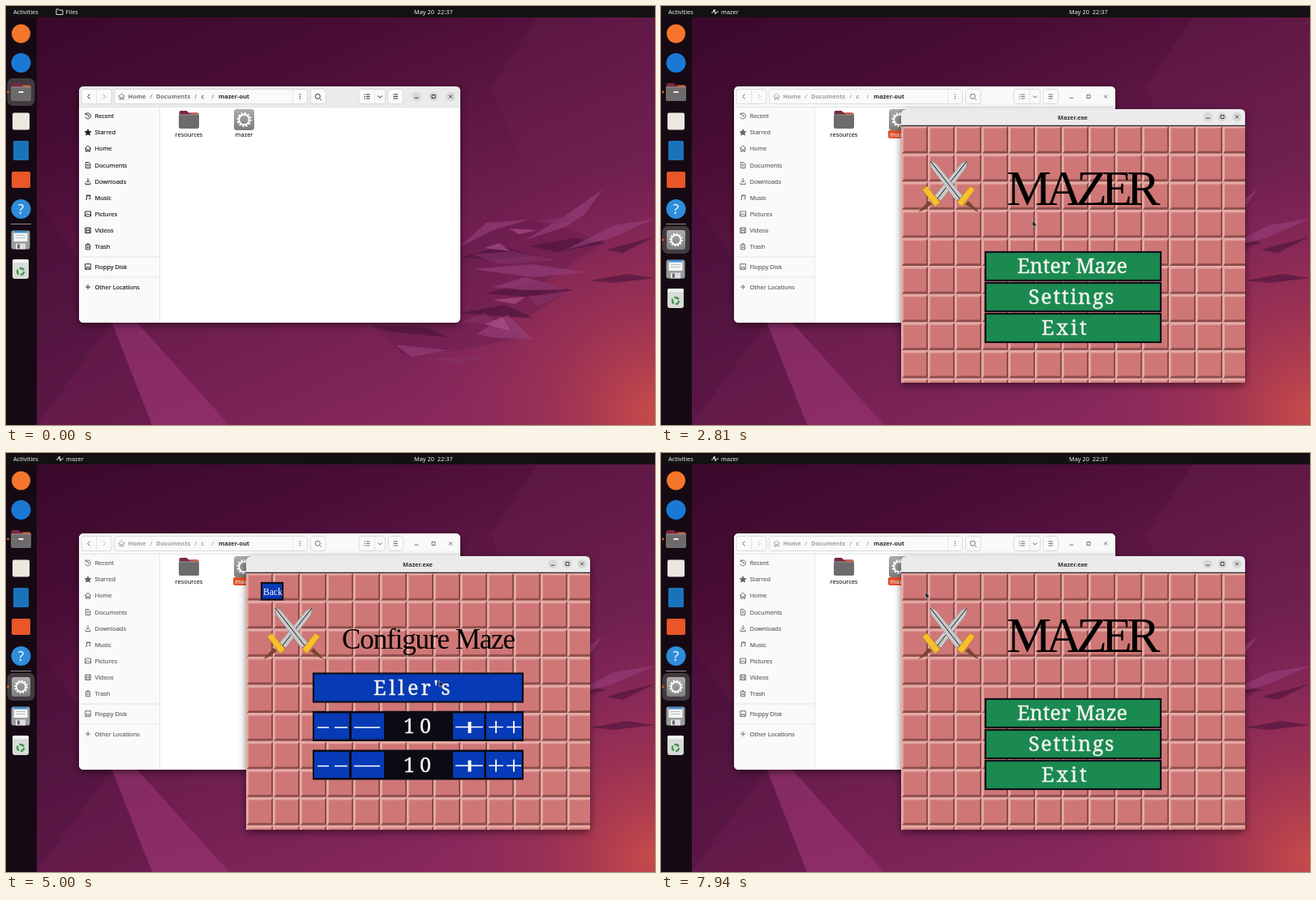
An HTML page for the animation above (8000 ms loop, 800x516 px).

```html
<!DOCTYPE html>
<html lang="en">
<head>
<meta charset="utf-8">
<title>Desktop maze game</title>
<style>
html, body { margin: 0; width: 100%; height: 100%; overflow: hidden; background: #2c0a22; }
svg { display: block; width: 100vw; height: 100vh; }
text { font: 500 7.4px "Noto Sans", "Open Sans", sans-serif; white-space: pre; }
.bold { font-weight: 700; }
.mid { text-anchor: middle; }
.btn { font: 400 25px "Noto Serif", "Liberation Serif", serif; fill: #f4f4ee; stroke: #f4f4ee; stroke-width: .4; }
.title { font: 400 62px "Liberation Serif", "Noto Serif", serif; letter-spacing: -6.9px; }
.sub { font: 400 35px "Liberation Serif", "Noto Serif", serif; letter-spacing: -1.1px; }
.back { font: 400 11.5px "Liberation Serif", serif; fill: #fff; }
.line { fill: none; stroke: currentColor; stroke-width: .9; }

.t { animation: 8s step-end infinite; }
.before { animation-name: before; }
.after { animation-name: after; }
.picked { animation-name: picked; }
.focused { animation-name: focused; }
.blurred { animation-name: blurred; }
.ink { animation-name: ink; fill: currentColor; }
.ink text:not(.bold) { stroke: currentColor; stroke-width: .16; }
.head { animation-name: head; }
.config { animation-name: config; }
.menu { animation-name: menu; }
.tree { animation-name: tree; }
.eller { animation-name: eller; }
.hand { animation-name: hand; }
.arrow { animation-name: arrow; }
.slide { animation: slide 8s infinite; }
.launch { animation: launch 8s infinite; }
.game { animation: game 8s infinite; transform-origin: 508px 296px; }
.pointer { animation: pointer 8s ease-in-out infinite; }

@keyframes before { 0% { opacity: 1 } 27% { opacity: 0 } }
@keyframes after { 0% { opacity: 0 } 27% { opacity: 1 } }
@keyframes picked { 0% { opacity: 0 } 21.5% { opacity: 1 } }
@keyframes focused { 0% { opacity: 1 } 31.2% { opacity: 0 } }
@keyframes blurred { 0% { opacity: 0 } 31.2% { opacity: 1 } }
@keyframes ink { 0% { color: #1c1c1c } 31.2% { color: #626262 } }
@keyframes head { 0% { fill: #ebebeb } 31.2% { fill: #f9f9f9 } }
@keyframes config { 0% { opacity: 0 } 43.75% { opacity: 1 } 95% { opacity: 0 } }
@keyframes menu { 0% { opacity: 1 } 43.75% { opacity: 0 } 95% { opacity: 1 } }
@keyframes tree { 0% { opacity: 1 } 61% { opacity: 0 } }
@keyframes eller { 0% { opacity: 0 } 61% { opacity: 1 } }
@keyframes hand { 0% { opacity: 0 } 7% { opacity: 1 } 13% { opacity: 0 } }
@keyframes arrow { 0% { opacity: 0 } 13% { opacity: 1 } }
@keyframes slide {
  0%, 27.6% { transform: translateY(0); animation-timing-function: ease-in-out }
  30.4%, 100% { transform: translateY(36px) }
}
@keyframes launch { 0%, 28.8% { opacity: 0 } 30.8%, 100% { opacity: 1 } }
@keyframes game {
  0%, 31.2% { opacity: 0; transform: scale(.92); animation-timing-function: ease-out }
  33.2%, 100% { opacity: 1; transform: none }
}
@keyframes pointer {
  0%, 7% { transform: translate(806px, 330px) }
  11.2%, 12% { transform: translate(421px, 258px) }
  20%, 31% { transform: translate(289px, 134px) }
  35.1%, 36.5% { transform: translate(458px, 264px) }
  41%, 45% { transform: translate(508px, 356px) }
  50%, 65% { transform: translate(534px, 280px) }
  71%, 76% { transform: translate(602px, 335px) }
  80%, 84% { transform: translate(602px, 382px) }
  93%, 100% { transform: translate(326px, 171px) }
}
</style>
</head>
<body>
<svg id="stage" viewBox="0 0 800 516" preserveAspectRatio="none"></svg>
<script>
const rect = (x, y, w, h, fill, more = '') =>
  `<rect x="${x}" y="${y}" width="${w}" height="${h}" fill="${fill}" ${more}/>`;
const circle = (x, y, r, fill, more = '') =>
  `<circle cx="${x}" cy="${y}" r="${r}" fill="${fill}" ${more}/>`;
const path = (d, fill, more = '') => `<path d="${d}" fill="${fill}" ${more}/>`;
const line = (d, more = '') => `<path d="${d}" class="line" ${more}/>`;
const text = (x, y, s, more = '') => `<text x="${x}" y="${y}" ${more}>${s}</text>`;
const group = (cls, ...parts) => `<g class="${cls}">${parts.join('')}</g>`;
const at = (x, y, s) => `<g transform="translate(${x} ${y})">${s}</g>`;

const defs = `<defs>
  <linearGradient id="sky" x1="0" y1="0" x2=".65" y2="1">
    <stop offset="0" stop-color="#370829"/><stop offset=".3" stop-color="#4a0d36"/>
    <stop offset=".65" stop-color="#6b1d4d"/><stop offset="1" stop-color="#88285d"/>
  </linearGradient>
  <radialGradient id="glow" gradientUnits="userSpaceOnUse" cx="800" cy="500" r="310">
    <stop offset="0" stop-color="#c84b49"/><stop offset=".4" stop-color="#a43650" stop-opacity=".7"/>
    <stop offset="1" stop-color="#8a285a" stop-opacity="0"/>
  </radialGradient>
  <linearGradient id="metal" x1="0" y1="0" x2="0" y2="1">
    <stop offset="0" stop-color="#adadad"/><stop offset="1" stop-color="#7e7e7e"/>
  </linearGradient>
  <pattern id="brick" patternUnits="userSpaceOnUse" x="296" y="147" width="33" height="34.6">
    ${rect(0, 0, 33, 34.6, '#e5aaa5')}
    ${path('M33 1V34.6H1L3.5 31.5H30.5V3.5Z', '#8c4b49')}
    ${rect(2.8, 3.5, 27.9, 28.3, '#cf7776')}
  </pattern>
  <filter id="shadow" x="-10%" y="-10%" width="120%" height="125%">
    <feDropShadow dx="0" dy="3" stdDeviation="5" flood-opacity=".5"/>
  </filter>
</defs>`;

const wallpaper = [
  rect(0, 0, 800, 516, 'url(#sky)'),
  path('M655 14H800V230L640 200L598 100Z', '#6d2450', 'opacity=".3"'),
  path('M38 240L88 310L130 390L38 516Z', '#46113a', 'opacity=".5"'),
  path('M38 516L130 390L180 516Z', '#541641', 'opacity=".4"'),
  path('M130 388H160L275 516H180Z', '#9a3573', 'opacity=".6"'),
  rect(400, 180, 400, 336, 'url(#glow)'),
  // Ribbons of facets: broad shade, dark undersides, lit edges, highlights.
  path('M560 296L640 264L690 274L740 290L690 322L650 350L690 354L640 385L600 380L640 408L560 424L490 430L450 392H560Z', '#5e1b4a', 'opacity=".35"'),
  path('M560 310L610 296L655 308L610 312ZM590 354L650 340L700 350L640 358ZM450 394L520 396L545 408L480 402ZM560 378L615 368L650 384L600 382ZM645 296L700 286L740 292L680 303ZM740 300L800 284L760 304ZM720 338L765 330L800 335L750 341Z', '#491339', 'opacity=".6"'),
  path('M560 296L592 267L645 263L600 276ZM640 288L690 258L735 226L714 256L690 272ZM690 300L750 270L800 262L745 286ZM575 324L650 318L715 328L650 334ZM580 404L618 380L650 411L600 408ZM480 417L545 424L500 432ZM600 346L640 334L690 349L640 350Z', '#95407a', 'opacity=".65"'),
  path('M575 306L625 302L680 313L610 318ZM645 358L695 352L655 370ZM655 264L705 258L680 270ZM520 434L590 432L558 440ZM560 390L590 378L610 392Z', '#84336a', 'opacity=".6"'),
  path('M590 298L608 292L622 302ZM620 274L655 276L632 281ZM600 362L640 358L628 367ZM590 392L612 383L622 400Z', '#b0508c', 'opacity=".65"'),
].join('');

const gear = (x, y, s = 1) => `<g transform="translate(${x} ${y}) scale(${s})">` +
  rect(-12.5, -13, 25, 26, 'url(#metal)', 'rx="3.5"') +
  circle(0, 0, 6.3, 'none', 'stroke="#fff" stroke-width="2"') +
  circle(0, 0, 8, 'none', 'stroke="#fff" stroke-width="2.2" stroke-dasharray="2.1 2.09"') + '</g>';

const folder = (x, y) => at(x, y,
  path('M-12 -9Q-12 -11 -10 -11H-3L0 -8.5H10Q12 -8.5 12 -6.5V2H-12Z', '#7b2741') +
  path('M2 -8.5H10Q12 -8.5 12 -6.5V-5H2Z', '#e25a2c') +
  rect(-12.5, -6.5, 25, 17.5, '#6e6b6c', 'rx="2"') + rect(-12.5, -6.5, 25, 1, '#918c8d'));

const floppy = at(18, 288,
  rect(-11.5, -11.5, 23, 23, '#9a9c9e', 'rx="2.5"') + rect(-8.5, -11, 17, 13, '#f3f5f5') +
  rect(-8.5, -11, 17, 2.5, '#3f8fd2') + rect(-6, -6, 12, 1, '#b8bcbc') + rect(-6, -3, 12, 1, '#b8bcbc') +
  rect(-6, 4.5, 12, 7, '#dcdede') + rect(-4, 5.5, 3, 5, '#666'));
const bin = at(18, 324,
  rect(-10, -12, 20, 24, '#d9dbd9', 'rx="3"') + rect(-10, -12, 20, 4, '#f5f5f5', 'rx="2"') +
  circle(0, 3, 4, 'none', 'stroke="#409a4d" stroke-width="2.4" stroke-dasharray="6.2 2.18"'));

const highlight = y => rect(1.5, y - 17, 34, 34, '#413b40', 'rx="7"');
const dot = y => circle(2.5, y, 1.4, '#e95420');
const dock = [
  rect(0, 14, 38, 502, '#150a13'),
  circle(18.5, 34, 11.5, '#f5762b'), circle(18.5, 70, 12, '#1b79d6'),
  group('t focused', highlight(106)), dot(106), at(18.5, 106, folder(0, 0) + rect(-3, -1, 6, 2, '#eee')),
  rect(8, 131.5, 21, 21, '#ece8df', 'rx="2"'), rect(9, 166, 19, 24, '#1a73ba', 'rx="1.5"'),
  rect(7, 204, 23, 20, '#e9562a', 'rx="2"'),
  circle(18.5, 250, 12, '#2f8ddb'),
  text(18.5, 256, '?', 'class="mid" fill="#fff" style="font-size:17px"'),
  rect(6, 268, 25, 1, '#918b90'),
  group('launch', group('t blurred', highlight(288)), dot(288), gear(18.5, 288, .92)),
  group('slide', floppy, bin),
].join('');

const topbar = rect(0, 0, 800, 14, '#131113') +
  `<g fill="#efefef" color="#efefef">` +
  text(9, 9.8, 'Activities') + text(503, 9.8, 'May 20  22:37') +
  group('t before', line('M62 4H65L66 5.2H70V10.5H62Z'), text(73.5, 9.8, 'Files')) +
  group('t after', line('M62 8H64L66 4L67 10L69 7H71M64 5L68 9'), text(74, 9.8, 'mazer')) + '</g>';

// Sidebar glyphs are drawn on an 8 x 8 box.
const glyphs = {
  home: 'M0 4L4 .5L8 4M1.5 3V7.5H3.2V5H4.8V7.5H6.5V3',
  clock: 'M1 2A3.5 3.5 0 1 1 .6 5M1 0V2H3M4 2V4.3H6',
  star: 'M4 .3L5.1 2.9L7.9 3.1L5.8 4.9L6.4 7.6L4 6.2L1.6 7.6L2.2 4.9L.1 3.1L2.9 2.9Z',
  doc: 'M1.3 .5H5L6.8 2.3V7.5H1.3ZM2.7 3.3H5.4M2.7 5H5.4',
  down: 'M4 0V5M2 3.3L4 5.3L6 3.3M1 5.5V7.5H7V5.5',
  music: 'M2.5 6V1H6.8V5.3M1 6.2H2.5M5.2 5.5H6.8M2.5 1.7H6.8',
  picture: 'M.5 1H7.5V7H.5ZM1 6L3 3.5L4.5 5L5.5 4L7 6',
  film: 'M.7 .8H7.3V7.2H.7ZM2.3 1V7M5.7 1V7M2.3 4H5.7',
  trash: 'M.8 1.7H7.2M3 1.5V.5H5V1.5M1.5 2V7.5H6.5V2M3.3 3.5V6M4.8 3.5V6',
  disk: 'M.7 .7H7.3V7.3H.7ZM2.3 7V4.7H5.7V7',
  plus: 'M4 1V7M1 4H7',
};
const places = [
  ['Recent', 'clock', 135.5], ['Starred', 'star', 155.5], ['Home', 'home', 175.7],
  ['Documents', 'doc', 196], ['Downloads', 'down', 216], ['Music', 'music', 236],
  ['Pictures', 'picture', 256], ['Videos', 'film', 276.3], ['Trash', 'trash', 296.3],
  ['Floppy Disk', 'disk', 321], ['Other Locations', 'plus', 346],
];
const sidebar = places.map(([label, icon, y]) =>
  at(97, y - 4, line(glyphs[icon], icon === 'star' ? 'style="fill:currentColor"' : '')) +
  text(109.5, y + 2.7, label)).join('');

const field = (x, w) => rect(x, 102.5, w, 18, '#fafafa', 'rx="3" stroke="#d3d3d3" stroke-width=".8"');
const windowSigns = (x, y, gap) =>
  line(`M${x - 2.3} ${y + 1.7}h4.6M${x + gap - 2} ${y - 2}h4v4h-4ZM${x + 2 * gap - 2} ${y - 2}l4 4m0 -4l-4 4`);
const windowDots = (x, y, gap, fill) => [0, 1, 2].map(i => circle(x + i * gap, y, 5.8, fill)).join('');

const files = [
  rect(90, 99, 470, 291, '#fff', 'rx="6" filter="url(#shadow)"'),
  path('M90 124H189.5V390H96Q90 390 90 384Z', '#fafafa'),
  `<path class="t head" d="M90 124V105Q90 99 96 99H554Q560 99 560 105V124Z"/>`,
  rect(90, 124, 470, .8, '#dcdcdc'), rect(189, 124, .8, 266, '#e0e0e0'),
  rect(90, 308.6, 99, .8, '#dedede'), rect(90, 333.6, 99, .8, '#dedede'),
  field(93, 37), field(133.5, 238), field(375.5, 18.5), field(435, 32.5), field(471, 18.5),
  rect(111, 103, .7, 17, '#ddd'), rect(353, 103, .7, 17, '#ddd'), rect(454, 103, .7, 17, '#ddd'),
  group('t focused', windowDots(506, 111.5, 21, '#d9d9d9')),
  group('t ink',
    sidebar, windowSigns(506, 111.5, 21),
    line('M103.5 108.5L100.5 111.5L103.5 114.5'),
    line('M119.5 108.5L122.5 111.5L119.5 114.5', 'opacity=".4"'),
    line('M387 114.3L388.8 116'), circle(384.3, 111.3, 3, 'none', 'stroke="currentColor" stroke-width=".9"'),
    [109, 111.5, 114].map(y => circle(362.5, y, .7, 'currentColor') + line(`M441.5 ${y}h1.5m1 0h4.5M477.5 ${y}h5.5`)).join(''),
    line('M458.5 110.5L461 113L463.5 110.5'),
    `<g opacity=".6">${at(138.5, 107.5, line(glyphs.home))}` +
      text(150.5, 114.3, 'Home', 'class="bold"') + text(177.5, 114.3, '/') +
      text(185, 114.3, 'Documents', 'class="bold"') + text(232.5, 114.3, '/') +
      text(240.5, 114.3, 'c', 'class="bold"') + text(253.5, 114.3, '/') + '</g>'),
  text(262, 114.3, 'mazer-out', 'class="bold" fill="#2c2c2c"'),
  folder(225.5, 140), text(225.5, 160.5, 'resources', 'class="mid"'),
  gear(293.5, 140), text(293.5, 160.5, 'mazer', 'class="mid"'),
  group('t picked',
    rect(280, 153, 27, 10, '#e2532b', 'rx="2"'),
    text(293.5, 160.5, 'mazer', 'class="mid" fill="#fff"'),
    path('M448.5 390V380Q448.5 378 450.5 378H560V384Q560 390 554 390Z', '#fafafa', 'stroke="#d6d6d6" stroke-width=".8"'),
    text(455, 387, '"mazer" selected  (155.0 kB)')),
].join('');

const sword = path('M22.5 -36L15 -32L-18 8L-10 14L21 -27Z', '#c9c9c9', 'stroke="#8f8988" stroke-width=".6"') +
  line('M22 -35L-14 11', 'stroke="#929292"') +
  path('M-25 14L-38 28L-33 26L-21 18Z', '#76462c') +
  path('M-33 0L-27 -4L-11 16L-17 21Z', '#f6c02d', 'stroke="#b88418" stroke-width=".7"');
const swords = at(355, 226, sword) + `<g transform="translate(354 226) scale(-1 1)">${sword}</g>`;

const box = (x, y, w, h, fill) => rect(x + 1, y + 1, w - 2, h - 2, fill, 'stroke="#10101a" stroke-width="2.2"');
const button = (y, label, x, spacing) =>
  box(399, y, 218, 37, '#1b8a50') + text(x, y + 27, label, `class="btn" style="letter-spacing:${spacing}px"`);

const blue = '#073ab6';
const counter = y => rect(378, y, 260, 37, '#0b0b14') +
  [[380, 43], [426, 40], [551, 38.5], [592, 44]].map(([x, w]) => rect(x, y + 2.5, w, 32, blue)).join('') +
  `<path d="M384 ${y + 20}h14m7 0h16M429 ${y + 20}h32M554 ${y + 19.5}h34M595 ${y + 19.5}h18m4 0h18" stroke="#fff" stroke-width="1.7"/>` +
  `<path d="M571.5 ${y + 13}v14" stroke="#fff" stroke-width="4"/>` +
  `<path d="M604 ${y + 12}v15m22 -15v15" stroke="#fff" stroke-width="1.8"/>` +
  text(490, y + 27, '10', 'class="btn" style="letter-spacing:6px"');

const game = group('game',
  rect(296, 127, 424, 337, '#2a2020', 'rx="5" filter="url(#shadow)"'),
  path('M296 147V133Q296 127 302 127H714Q720 127 720 133V147Z', '#ebebeb'),
  text(507.5, 139.6, 'Mazer.exe', 'class="mid bold" fill="#303030"'),
  windowDots(674, 136.5, 18, '#d9d9d9'), `<g color="#303030">${windowSigns(674, 136.5, 18)}</g>`,
  rect(296, 148, 424, 316, 'url(#brick)'), rect(296, 146.8, 424, 1.3, '#29262a'),
  swords,
  group('t menu',
    text(426, 245, 'MAZER', 'class="title"'),
    button(302, 'Enter Maze', 439, 0), button(340, 'Settings', 453, 1.7), button(378, 'Exit', 469, 3)),
  group('t config',
    box(314, 159, 28, 22.5, blue), text(317, 174.5, 'Back', 'class="back"'),
    text(414, 241, 'Configure Maze', 'class="sub"'),
    box(378, 270.5, 260, 37, blue),
    group('t tree', text(423, 297.5, 'Binary Tree', 'class="btn" style="letter-spacing:2px"')),
    group('t eller', text(453, 297.5, "Eller's", 'class="btn" style="letter-spacing:3.6px"')),
    counter(318), counter(365.5)));

const pointer = group('pointer',
  group('t arrow', path('M0 0V8L1.8 6.4L3 9L4.3 8.4L3.1 5.9H5.4Z', '#151515', 'stroke="#eee" stroke-width=".5"')),
  group('t hand', path('M0 1Q.9 -1 1.8 1V4.3L5.2 5Q6.5 5.4 6.3 7L5.5 11H1.2L-1.7 7.3Q-1.6 5.7 0 6.8Z', '#fff', 'stroke="#333" stroke-width=".9"')));

document.getElementById('stage').innerHTML = defs + wallpaper + files + dock + topbar + game + pointer;
</script>
</body>
</html>
```
